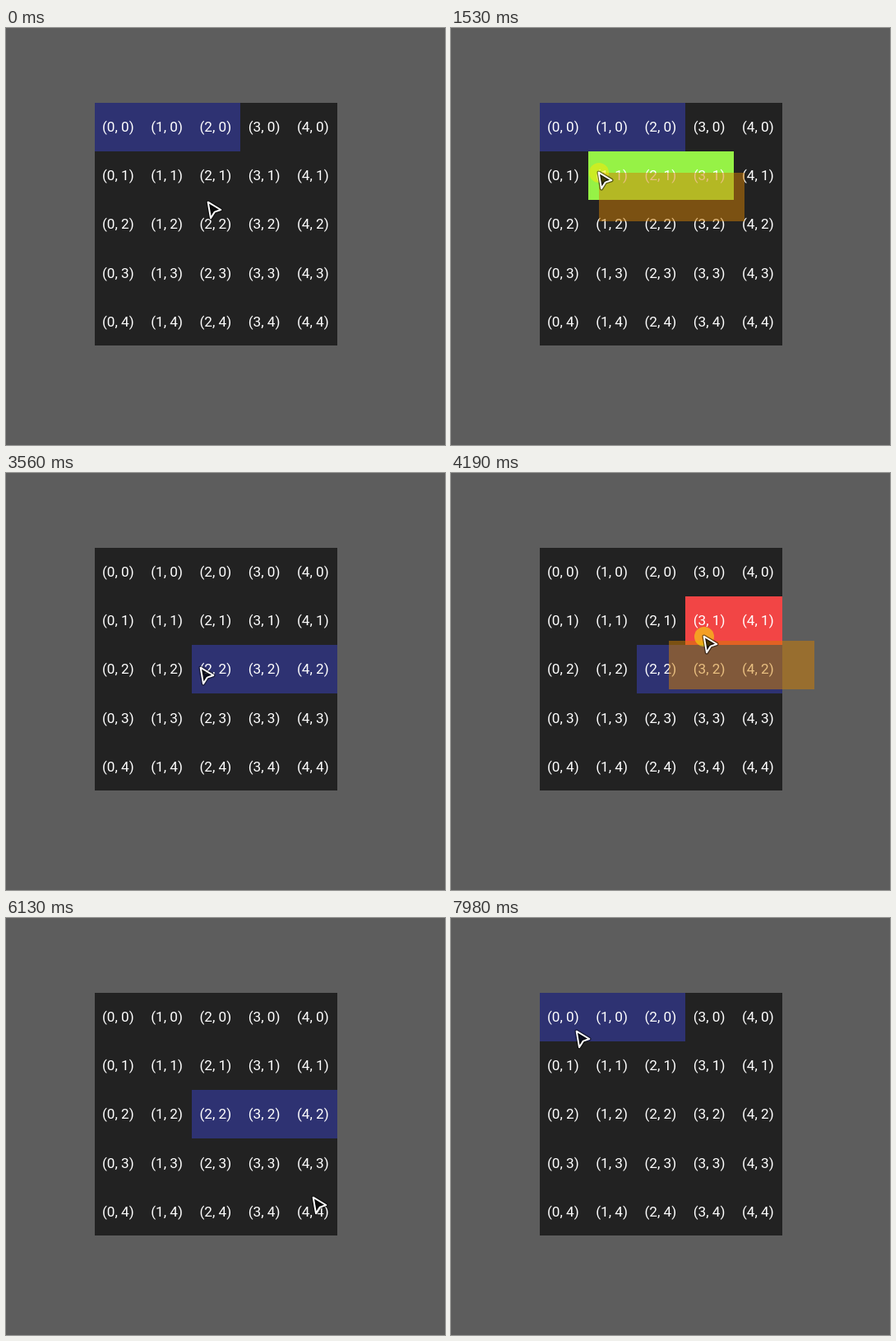
These frames come from a looping animation (534 by 507 pixels, 8000 ms). An HTML page with a canvas:

```html
<!DOCTYPE html>
<html lang="en">
<head>
<meta charset="utf-8">
<title>Grid drag and drop</title>
<style>
  html, body { margin: 0; width: 100%; height: 100%; overflow: hidden; background: #5d5d5d; }
  canvas { display: block; }
</style>
</head>
<body>
<canvas id="stage" width="534" height="507"></canvas>
<script>
const ctx = document.getElementById('stage').getContext('2d');
const LOOP = 8000, STEP = 77, LERP = 240;
const LEFT = 108, TOP = 91, CELL = 59, COUNT = 5, SPAN = 3;
const arrow = new Path2D('M-.3-.3L15.3 9L7.8 11.6L3 19.2Z');

// Pointer gestures: each curves from the end of the one before
const home = [246, 212];
const moves = [
  { start: 0, end: 690, via: [245, 340], to: [124, 105] },
  { start: 840, end: 1530, via: [244, 140], to: [180, 176] },
  { start: 1930, end: 2470, via: [230, 190], to: [271, 195] },
  { start: 2550, end: 3010, via: [262, 238], to: [237, 237] },
  { start: 3560, end: 4190, via: [270, 350], to: [308, 199] },
  { start: 4190, end: 4720, via: [385, 123], to: [377, 101] },
  { start: 4810, end: 5960, via: [375, 213], to: [374, 340] },
  { start: 6200, end: 6820, via: [330, 370], to: [264, 234] },
  { start: 6820, end: 7590, via: [240, 143], to: [153, 138] }
];

// When the bar is held, and the cell where it lands
const drags = [
  { grab: 765, drop: 1930, cell: [1, 1] },
  { grab: 2480, drop: 3560, cell: [2, 2] },
  { grab: 4075, drop: 6130, cell: [2, 2] },
  { grab: 6760, drop: 7910, cell: [0, 0] }
];

const mix = (a, b, u) => a + (b - a) * u;
const mixPoint = (p, q, u) => p.map((v, i) => mix(v, q[i], u));
const moveIndex = t => moves.filter(m => m.start <= t).length - 1;

// The pointer is only sampled every STEP
function sampleTime(t) {
  const { start } = moves[moveIndex(t)];
  return start + Math.floor((t - start + 6) / (STEP - .5)) * STEP;
}

function pointerAt(t) {
  const i = moveIndex(t);
  const { start, end, via, to } = moves[i];
  const from = i ? moves[i - 1].to : home;
  const u = Math.min(1, (t - start) / (end - start));
  return mixPoint(mixPoint(from, via, u), mixPoint(via, to, u), u);
}

const cellAt = ([x, y]) => [Math.floor((x - LEFT) / CELL), Math.floor((y - TOP) / CELL)];
const cellPos = ([col, row]) => [LEFT + col * CELL, TOP + row * CELL];

function fillCells(cell, color) {
  ctx.fillStyle = color;
  ctx.fillRect(...cellPos(cell), Math.min(SPAN, COUNT - cell[0]) * CELL, CELL);
}

function drawLabels() {
  ctx.font = '17.2px Roboto, sans-serif';
  ctx.textAlign = 'center';
  ctx.fillStyle = '#fff';
  for (let row = 0; row < COUNT; row++)
    for (let col = 0; col < COUNT; col++)
      ctx.fillText(`(${col}, ${row})`, 136.3 + col * 59.25, Math.round(126 + row * 59.2));
}

function outline(width, color) {
  ctx.lineWidth = width;
  ctx.strokeStyle = color;
  ctx.stroke(arrow);
}

function drawPointer([x, y], held) {
  ctx.save();
  ctx.translate(x, y);
  if (held) {
    ctx.fillStyle = 'rgba(248,234,10,.55)';
    ctx.beginPath();
    ctx.arc(0, 0, 12, 0, Math.PI * 2);
    ctx.fill();
  }
  ctx.lineJoin = 'round';
  ctx.fillStyle = 'rgba(0,0,0,.7)';
  ctx.fill(arrow);
  outline(4.6, 'rgba(0,0,0,.5)');
  outline(2, '#fff');
  ctx.restore();
}

function draw(t) {
  const now = sampleTime(t);
  const pointer = pointerAt(now);
  const landed = drags.filter(d => d.drop <= t).pop();
  const cell = landed ? landed.cell : [0, 0];
  const drag = drags.find(d => now >= d.grab && t < d.drop);

  ctx.fillStyle = '#5d5d5d';
  ctx.fillRect(0, 0, 534, 507);
  ctx.fillStyle = '#222';
  ctx.fillRect(LEFT, TOP, CELL * COUNT, CELL * COUNT);
  fillCells(cell, '#2e3272');

  if (drag) {
    const over = cellAt(pointer);
    const origin = cellAt(pointerAt(drag.grab));
    if (over.join() !== origin.join())
      fillCells(over, over[0] + SPAN <= COUNT ? '#96f246' : '#f24545');
  }
  drawLabels();
  if (drag) {
    const u = Math.min(1, (now - drag.grab) / LERP);
    const corner = mixPoint(cellPos(cell), pointer, u).map(Math.round);
    ctx.fillStyle = 'rgba(212,128,2,.5)';
    ctx.fillRect(...corner, SPAN * CELL, CELL);
  }
  drawPointer(pointer, drag);
}

const begin = performance.now();
function tick() {
  draw(Math.max(0, performance.now() - begin) % LOOP);
  requestAnimationFrame(tick);
}
tick();
</script>
</body>
</html>
```
